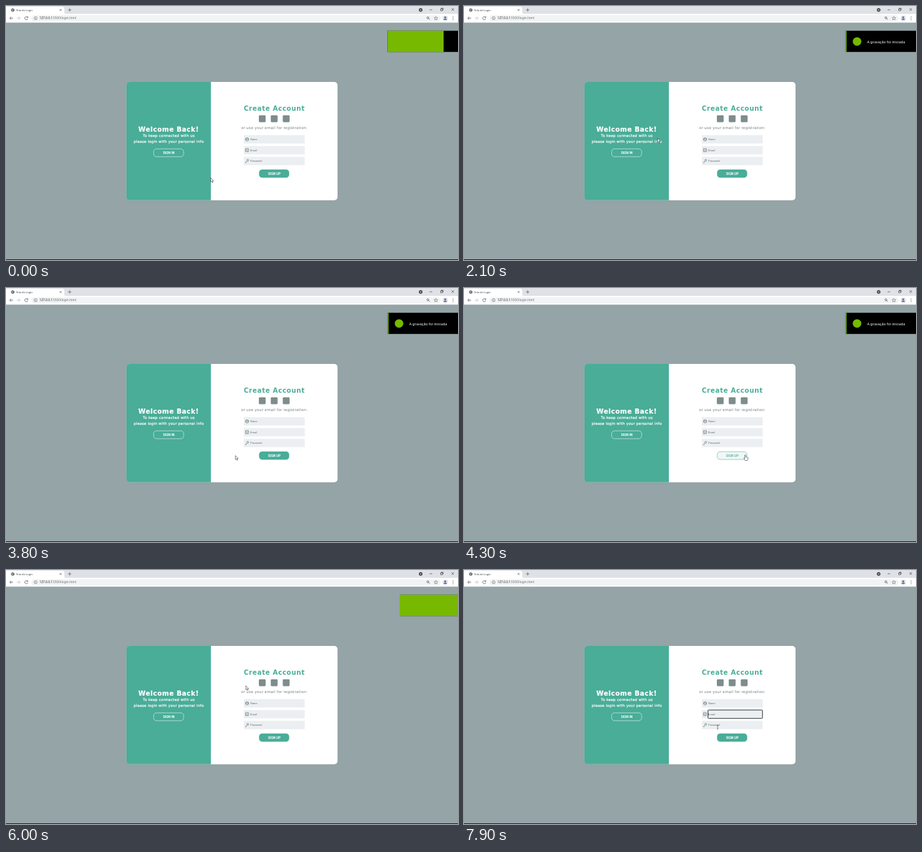
An HTML page for the animation above (8 s loop, 690 by 388 pixels).

```html
<!DOCTYPE html>
<html lang="pt-BR">
<head>
<meta charset="utf-8">
<title>Tela de Login</title>
<style>
html, body { margin: 0; width: 100%; height: 100%; overflow: hidden; background: #95a4a6; }
svg { display: block; width: 100%; height: 100%; }
text { font-family: "Noto Sans", "Open Sans", sans-serif; }
.wide { font: 5.6px "DejaVu Sans", sans-serif; letter-spacing: .035em; text-anchor: middle; stroke-width: .2px; }
.title { font-size: 10px; font-weight: bold; letter-spacing: .05em; }
.white { fill: #fff; stroke: #fff; }
.teal { fill: #49ad98; }
.grey { fill: #7f8c8d; stroke: #7f8c8d; stroke-width: .05px; }
.button text { font: bold 5px Roboto, sans-serif; text-anchor: middle; fill: #fff; }
.button rect { stroke-width: .55px; }
#signIn rect { fill: #49ad98; stroke: #fff; }
#signUp rect { fill: #49ad98; stroke: #49ad98; }
#signIn.hover rect { fill: #eaf6f8; stroke: #eaf6f8; }
#signUp.hover rect { fill: #eff7f6; }
.button.hover text { fill: #6fb8a9; }
.social { fill: #7f8c8d; }
.social.hover { fill: #485358; }
.field { fill: #eceff1; }
.field text { font: 4px "Liberation Sans", Arial, sans-serif; fill: #5f6568; }
.glyph { fill: none; stroke: #5f6368; stroke-width: .8px; }
.thin { stroke-width: .6px; }
.small { fill: none; stroke: #7f8c8d; stroke-width: .9px; }
</style>
</head>
<body>
<svg viewBox="0 0 690 388" preserveAspectRatio="none">
  <g id="browser">
    <rect width="690" height="388" fill="#95a4a6"/>
    <rect width="690" height="12.5" fill="#dee1e6"/>
    <path d="M0 1h85q4 0 4 4v4q0 3.5 3 3.5H0z" fill="#fff"/>
    <rect y="12" width="690" height="13.4" fill="#fff"/>
    <circle cx="10.3" cy="6" r="2.6" fill="#5f6368"/>
    <path d="M8.4 5.2l2 .8-.6 1.5M10.5 4l1.6 1.3" stroke="#fff" stroke-width=".7" fill="none"/>
    <text x="15.3" y="7.7" font-size="4.15" fill="#3c4043">Tela de Login</text>
    <path class="glyph" d="M82 4.7l2.8 2.8m0-2.8L82 7.5M94.7 6h5M97.2 3.5v5"/>
    <path class="glyph" d="M10.8 18.6H5.8m2.4-2.4l-2.4 2.4 2.4 2.4M33 17.3a2.4 2.4 0 1 0 .3 1.9M33.3 15.8v1.8h-1.8"/>
    <path class="glyph" d="M16.5 18.6h5m-2.4-2.4l2.4 2.4-2.4 2.4" style="stroke:#bcc0c3"/>
    <rect x="38.5" y="14" width="625" height="9.5" rx="4.7" fill="#f1f3f4"/>
    <circle class="glyph thin" cx="45.2" cy="18.6" r="2.3"/>
    <path class="glyph thin" d="M45.2 18.2v1.7m0-2.8v.5"/>
    <text x="51" y="20.3" font-size="4.69" fill="#202124">127.0.0.1<tspan fill="#6b7075">:5500/login.html</tspan></text>
    <circle class="glyph" cx="644" cy="18" r="1.5"/>
    <path class="glyph" d="M645.1 19.1l1.8 1.8"/>
    <path class="glyph thin" d="M656.3 15.9l.8 1.8 2 .2-1.5 1.3.5 2-1.8-1.1-1.8 1.1.5-2-1.5-1.3 2-.2z"/>
    <circle cx="670.5" cy="18.6" r="4" fill="#d9e1ee"/>
    <circle cx="670.5" cy="17.4" r="1.3" fill="#5f6368"/>
    <path d="M668 21.2q0-2 2.5-2t2.5 2z" fill="#5f6368"/>
    <path d="M682.4 16.4v.1m0 2.1v.1m0 2.1v.1" stroke="#5f6368" stroke-width="1.1" stroke-linecap="round"/>
    <circle cx="633" cy="6" r="2.7" fill="#3c4043"/>
    <path d="M631.7 5.4h2.6L633 7.2z" fill="#fff"/>
    <path class="glyph thin" d="M646.7 5.8h3.8M663.5 4.4h2.8v2.8h-2.8zM664.5 4.2v-.9h2.8v2.8h-.8M680.2 3.6l3.6 3.6m0-3.6l-3.6 3.6" style="stroke:#222"/>
    <rect y="387" width="690" height="1" fill="#15191b"/>
  </g>

  <rect x="183.9" y="116.1" width="322.2" height="180.6" rx="5" fill="#fff"/>
  <path class="teal" d="M312.8 116.1H188.9q-5 0-5 5v170.6q0 5 5 5H312.8z"/>

  <text class="wide title white" x="248.3" y="191.6">Welcome Back!</text>
  <text class="wide white" x="248.5" y="200.2">To keep connected with us</text>
  <text class="wide white" x="248.5" y="209.2">please login with your personal info</text>
  <g id="signIn" class="button hot">
    <rect x="225.4" y="218.2" width="45.8" height="12" rx="4.3"/>
    <text x="248.5" y="225.8">SIGN IN</text>
  </g>

  <text class="wide title teal" x="409.6" y="159.6">Create Account</text>
  <rect class="social hot" x="386" y="167" width="10.4" height="10.4" rx="1.3"/>
  <rect class="social hot" x="404.2" y="167" width="10.4" height="10.4" rx="1.3"/>
  <rect class="social hot" x="422.5" y="167" width="10.4" height="10.4" rx="1.3"/>
  <text class="wide grey" x="409.6" y="188">or use your email for registration:</text>

  <g class="field">
    <rect x="363" y="197.3" width="93" height="12.8"/>
    <circle cx="368" cy="203.7" r="2.7" fill="#7f8c8d"/>
    <circle cx="368" cy="202.9" r="1"/>
    <path d="M366.2 205.6q0-1.3 1.8-1.3t1.8 1.3z"/>
    <text x="373" y="205.2">Name</text>
  </g>
  <g class="field">
    <rect x="363" y="213.9" width="93" height="12.8"/>
    <path class="small" d="M365.7 217.9h4.4v4.6h-4.4zM366.2 219.5l1.7 1.3 1.7-1.3"/>
    <text x="372.8" y="221.7">Email</text>
  </g>
  <g class="field">
    <rect x="363" y="230.4" width="93" height="12.8"/>
    <circle class="small" cx="369" cy="235.7" r="1.4"/>
    <path class="small" d="M368 236.8l-2.5 2.6h1.5"/>
    <text x="373" y="238.2">Password</text>
  </g>
  <rect id="focus" x="372.5" width="83.2" height="12.8" rx="1" fill="none" stroke="#20272b" stroke-width=".95"/>

  <g id="signUp" class="button hot">
    <rect x="386.6" y="250" width="45.4" height="12" rx="4.3"/>
    <text x="409.5" y="257.6">SIGN UP</text>
  </g>

  <g id="toast">
    <rect id="toastBack" x="582.4" y="37.8" width="108" height="32.4"/>
    <g id="toastBody">
      <circle cx="600" cy="54.2" r="6.5" fill="#76b900"/>
      <text x="615.4" y="56.6" font-size="5.5" fill="#fff">A gravação foi iniciada</text>
    </g>
    <rect id="toastGreen" y="37.8" height="32.4" fill="#76b900"/>
  </g>

  <g id="cursor" stroke="#222" stroke-width=".55" stroke-linejoin="round">
    <path id="arrow" d="M0 0v6.2l1.4-1.3 1 2.3 1.1-.5-1-2.2h1.9z" fill="#fff"/>
    <path id="hand" d="M.2.2Q.9-.5 1.6.2V3l2.8.7q.8.3.7 1.3l-.5 2.3-.6 1.2H.7L-1.1 5.6q-.4-.9.4-1l.9.7z" fill="#fff"/>
    <path id="beam" d="M-1.1-2.8H-.4L0-2.5.4-2.8h.7M0-2.5v5M-1.1 2.8h.7L0 2.5.4 2.8h.7" fill="none"/>
  </g>
</svg>
<script>
const LOOP = 8000, STEP = 100;
const $ = id => document.getElementById(id);
const clamp = u => Math.min(1, Math.max(0, u));
const progress = (t, from, to) => clamp((t - from) / (to - from));
const show = (id, on) => $(id).setAttribute("visibility", on ? "visible" : "hidden");

// Each leg curves from the previous stop to the next, bent towards "via".
const home = [312.5, 262.5];
const legs = [
  { from: 1300, to: 1400, stop: [312.5, 257.5] },
  { from: 1600, to: 2600, stop: [250, 223.5], via: [309.7, 163.5] },
  { from: 3200, to: 4300, stop: [428.5, 255], via: [345, 270] },
  { from: 4300, to: 5400, stop: [414.5, 173], via: [450, 205] },
  { from: 5400, to: 6200, stop: [350, 178] },
  { from: 6200, to: 6900, stop: [373, 253], via: [295, 225] },
  { from: 7000, to: 7300, stop: [385, 206] },
  { from: 7400, to: 7900, stop: [387.2, 240] }
];

function pointer(t) {
  let point = home;
  for (const { from, to, stop, via } of legs) {
    const u = progress(t, from, to);
    point = point.map((p, i) => {
      const bend = via ? via[i] : (p + stop[i]) / 2;
      return (1 - u) ** 2 * p + 2 * u * (1 - u) * bend + u * u * stop[i];
    });
  }
  return point;
}

function contains(element, x, y) {
  const box = element.getBBox();
  return x >= box.x && x <= box.x + box.width && y >= box.y && y <= box.y + box.height;
}

const hotSpots = [...document.querySelectorAll(".hot")];
const fields = [...document.querySelectorAll(".field")];

function drawPointer(t) {
  const [x, y] = pointer(t);
  let kind = fields.some(field => contains(field, x, y)) ? "beam" : "arrow";
  for (const spot of hotSpots) {
    const hover = contains(spot, x, y);
    spot.classList.toggle("hover", hover);
    if (hover) kind = "hand";
  }
  for (const id of ["arrow", "hand", "beam"]) show(id, id === kind);
  $("cursor").setAttribute("transform", `translate(${x} ${y})`);
}

function drawToast(t) {
  const opened = progress(t, 0, 400), covered = progress(t, 5500, 5900), gone = progress(t, 5900, 6200);
  const left = 582.4 + 108 * gone ** 1.6;
  const right = 584 + 84 * (1 - opened) ** 2 + 106 * covered ** 2;
  show("toast", gone < 1);
  $("toastBack").setAttribute("x", left);
  $("toastGreen").setAttribute("x", left);
  $("toastGreen").setAttribute("width", Math.max(0, right - left));
  $("toastBody").setAttribute("opacity", progress(t, 200, 600) - progress(t, 5500, 5800));
}

function drawFocus(t) {
  const field = fields[t < 7700 ? 0 : 1];
  show("focus", t >= 7400);
  $("focus").setAttribute("y", field.getBBox().y);
}

const start = performance.now();
function frame() {
  const t = Math.floor((performance.now() - start) % LOOP / STEP) * STEP;
  drawToast(t);
  drawPointer(t);
  drawFocus(t);
  requestAnimationFrame(frame);
}
frame();
</script>
</body>
</html>
```
